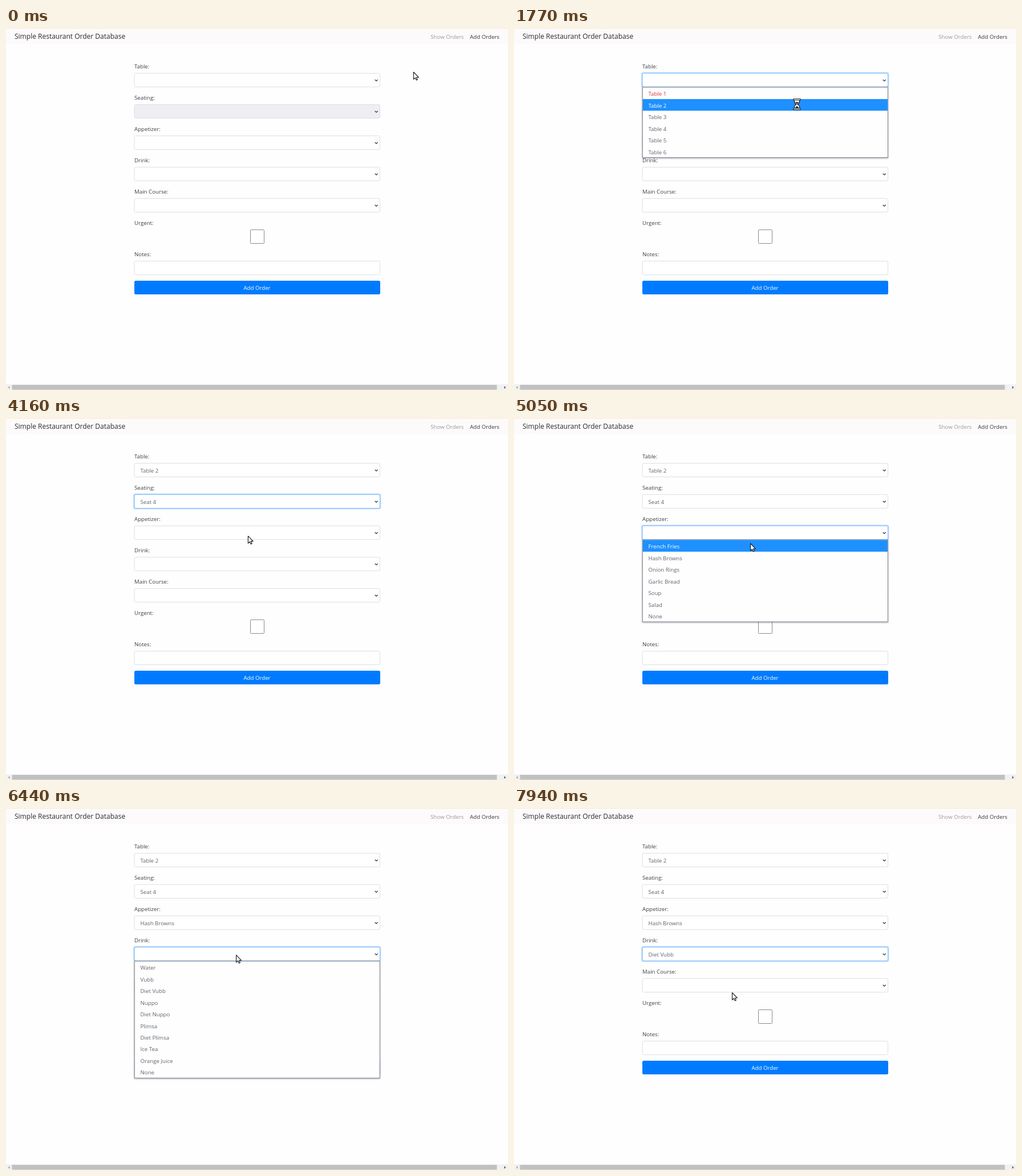
An HTML page for the animation above (8 s loop, 880 px wide and 636 px high).

```html
<!DOCTYPE html>
<html lang="en">
<head>
<meta charset="utf-8">
<title>Order form</title>
<style>
  html, body { margin: 0; width: 100%; height: 100%; overflow: hidden; background: #fefefe; }
  svg { display: block; width: 880px; height: 636px; }
  text { font: 9.7px "Open Sans", "Noto Sans", sans-serif; fill: #3d4146; }
  .value, .option { fill: #5f666d; }
  .popup { filter: drop-shadow(0 1px 1.5px rgba(30, 30, 60, .4)); }
</style>
</head>
<body>
<svg id="stage" viewBox="0 0 880 636"></svg>
<script>
const LOOP = 8000, ROW = 20.46, PITCH = 55, FADE = 150;
const stage = document.getElementById('stage');

function add(parent, tag, attrs, content) {
  const node = document.createElementNS('http://www.w3.org/2000/svg', tag);
  for (const key in attrs) node.setAttribute(key, attrs[key]);
  if (content) node.textContent = content;
  parent.appendChild(node);
  return node;
}
const rect = (parent, x, y, width, height, fill, more) =>
  add(parent, 'rect', { x, y, width, height, fill, ...more });
const label = (parent, x, y, content, more) => add(parent, 'text', { x, y, ...more }, content);
const show = (node, on) => node.setAttribute('visibility', on ? 'visible' : 'hidden');
const clamp = v => Math.max(0, Math.min(1, v));

// focus: ring on/off; open: popup on/off; off: number of disabled options at the top
const selects = [
  { name: 'Table:', focus: [1690, 2430], open: [1690, 2080], pick: 1, off: 1,
    options: [1, 2, 3, 4, 5, 6].map(n => 'Table ' + n) },
  { name: 'Seating:', focus: [2430, 4650], open: [2440, 3650], pick: 3, off: 3,
    options: [1, 2, 3, 4].map(n => 'Seat ' + n) },
  { name: 'Appetizer:', focus: [4650, 6270], open: [4700, 5580], pick: 1, off: 0,
    options: ['French Fries', 'Hash Browns', 'Onion Rings', 'Garlic Bread', 'Soup', 'Salad', 'None'] },
  { name: 'Drink:', focus: [6270, 9000], open: [6300, 7760], pick: 2, off: 0,
    options: ['Water', 'Vubb', 'Diet Vubb', 'Nuppo', 'Diet Nuppo', 'Plimsa', 'Diet Plimsa',
      'Ice Tea', 'Orange Juice', 'None'] },
  { name: 'Main Course:' }
];
const SEATING_READY = 2100, BUSY = [1690, 1900];

// pointer tip: time, x, y
const path = [
  [0, 714, 77], [60, 713, 78], [800, 612, 86], [1400, 502, 94], [1620, 497, 97], [1755, 496, 134],
  [2080, 494, 135], [2380, 472, 148], [2500, 471, 149], [2940, 464, 170], [3450, 444, 229],
  [3660, 441, 232], [4100, 424, 207], [4680, 420, 206], [5050, 414, 220], [5330, 409, 246],
  [5580, 409, 246], [5900, 406, 250], [6300, 404, 255], [7060, 394, 288], [7200, 394, 288],
  [7600, 383, 322], [7760, 382, 324], [8000, 382, 324]
];

function pointerAt(t) {
  const i = Math.max(1, path.findIndex(p => p[0] >= t));
  const [t0, x0, y0] = path[i - 1], [t1, x1, y1] = path[i];
  const u = clamp((t - t0) / (t1 - t0)), e = u * u * (3 - 2 * u);
  return [x0 + (x1 - x0) * e, y0 + (y1 - y0) * e];
}

function buildPage() {
  rect(stage, 0, 0, 880, 636, '#fefefe');
  rect(stage, 0, 0, 880, 28, '#fdfafc');
  rect(stage, 0, 0, 880, 1, '#fbe9c4');
  label(stage, 15, 19.4, 'Simple Restaurant Order Database', { style: 'font-size:12px;fill:#2b2b2e' });
  label(stage, 802.5, 18.8, 'Show Orders', { 'text-anchor': 'end', style: 'fill:#9b999b' });
  label(stage, 865, 18.8, 'Add Orders', { 'text-anchor': 'end', style: 'fill:#39383a' });

  [...selects.map(s => s.name), 'Urgent:', 'Notes:'].forEach((name, i) =>
    label(stage, 225, (i > 4 ? 70.6 : 70.8) + PITCH * i, name));

  rect(stage, 428.5, 354.5, 24, 24, '#fff', { rx: 1, stroke: '#8a8a8a' });
  rect(stage, 225, 409.5, 430.5, 24, '#fff', { rx: 2.5, stroke: '#dcdfe3' });
  rect(stage, 225, 444, 431, 24, '#007bff', { rx: 2.5 });
  label(stage, 440, 459.8, 'Add Order', { 'text-anchor': 'middle', style: 'fill:#fff' });

  rect(stage, 0, 626, 880, 10, '#f1f1f1');
  rect(stage, 10.5, 627, 850, 8.5, '#c1c1c1');
  add(stage, 'path', { d: 'M6.5 629V634L3.8 631.5Z', fill: '#a3a3a3' });
  add(stage, 'path', { d: 'M873.5 629V634L876.2 631.5Z', fill: '#505050' });
}

function buildSelect(s, i) {
  const y = 79.5 + PITCH * i;
  s.ring = rect(stage, 223, y - 2, 434.5, 28, '#bfdeff', { rx: 4 });
  s.box = rect(stage, 225, y, 430.5, 24, '#fff', { rx: 2.5, stroke: '#dcdfe3' });
  s.edge = rect(stage, 225, y, 430.5, 24, 'none', { rx: 2.5, stroke: '#80bdff' });
  add(stage, 'path', { d: `M646.7 ${y + 11.2}l2.5 2.5 2.5-2.5`, fill: 'none',
    stroke: '#343a40', 'stroke-width': 1.3 });
  s.top = y + 24.9;
  if (s.options) s.value = label(stage, 235.5, y + 16.2, s.options[s.pick], { class: 'value' });
}

function buildPopup(s) {
  if (!s.options) return;
  s.popup = add(stage, 'g', {});
  const height = s.options.length * ROW;
  rect(s.popup, 225.3, s.top - .4, 430, height + .8, '#fefefe', { class: 'popup', stroke: '#85858f' });
  s.bar = rect(s.popup, 225.7, s.top, 429.2, ROW, '#1e90ff');
  s.items = s.options.map((name, k) =>
    label(s.popup, 235.5, s.top + k * ROW + 14.8, name, { class: 'option' }));
}

buildPage();
selects.forEach(buildSelect);
selects.forEach(buildPopup);

const arrow = add(stage, 'path', { d: 'M.5.5V13.2L3.4 10.5 5.3 14.6 7.3 13.7 5.5 9.7H9.3Z',
  fill: '#fff', stroke: '#16161c', 'stroke-width': 1.1, 'stroke-linejoin': 'round' });
const glass = add(stage, 'g', {});
add(glass, 'path', { d: 'M-4.5-8V-5Q-4.5-2-1 0-4.5 2-4.5 5V8H4.5V5Q4.5 2 1 0 4.5-2 4.5-5V-8Z',
  fill: '#fff', stroke: '#1b1b20', 'stroke-width': 1.2 });
add(glass, 'path', { d: 'M-3-4H3L0-.5ZM-3.5 7Q-2 4 0 3 2 4 3.5 7Z', fill: '#33333a' });
rect(glass, -6, -9.5, 12, 2.4, '#fff', { stroke: '#1b1b20' });
rect(glass, -6, 7.1, 12, 2.4, '#fff', { stroke: '#1b1b20' });

function drawSelect(s, i, t, y) {
  const [on, off] = s.focus || [9000, 9000];
  const glow = clamp((t - on) / (i ? FADE : 60)) * (1 - clamp((t - off) / FADE));
  s.ring.setAttribute('opacity', glow);
  s.edge.setAttribute('opacity', glow);
  if (i === 1) s.box.setAttribute('fill', t < SEATING_READY ? '#eeeef3' : '#fff');
  if (!s.options) return;

  const [open, close] = s.open;
  const isOpen = t >= open && t < close;
  show(s.value, t >= close);
  show(s.popup, isOpen);
  const k = Math.floor((y - s.top) / ROW);
  const hover = isOpen && k >= s.off && k < s.options.length ? k : -1;
  show(s.bar, hover >= 0);
  s.bar.setAttribute('y', s.top + Math.max(0, hover) * ROW);
  s.items.forEach((item, n) => {
    item.style.fill = n < s.off ? '#dc3545' : n === hover ? '#fff' : '';
  });
}

function draw(t) {
  const [x, y] = pointerAt(t);
  selects.forEach((s, i) => drawSelect(s, i, t, y));
  const busy = t >= BUSY[0] && t < BUSY[1];
  show(arrow, !busy);
  show(glass, busy);
  for (const node of [arrow, glass]) node.setAttribute('transform', `translate(${x} ${y})`);
}

const start = performance.now();
function tick() {
  draw((performance.now() - start) % LOOP);
  requestAnimationFrame(tick);
}
tick();
</script>
</body>
</html>
```
